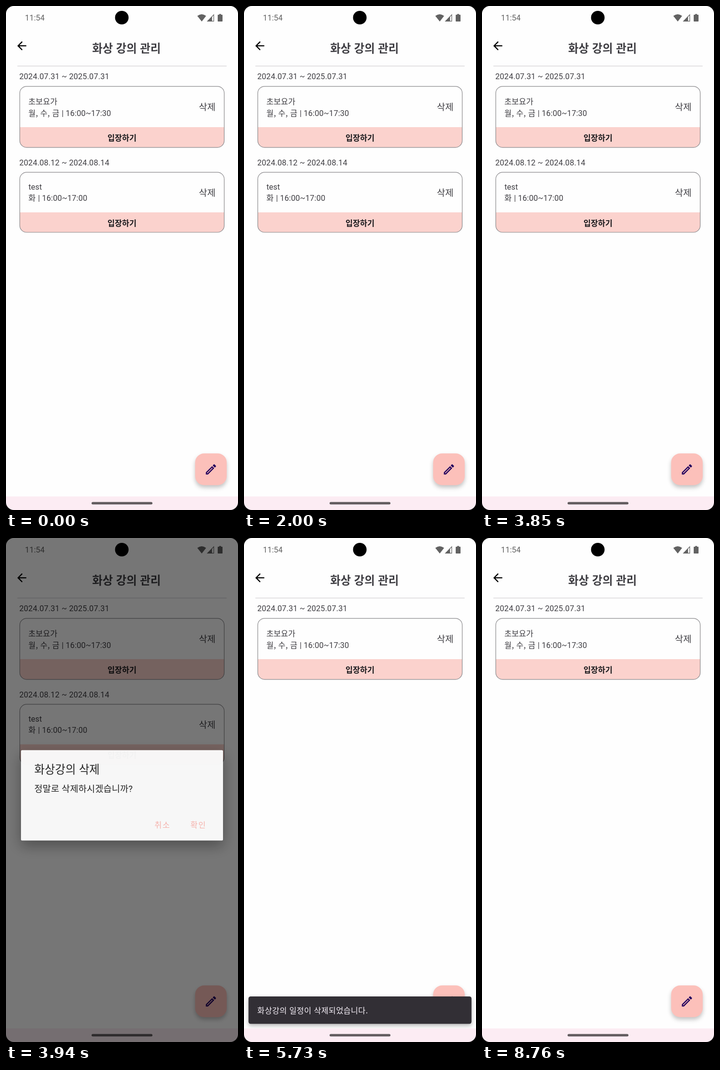
Recreate the animation shown at these times as an HTML page. Size 480x1040 px, loop 8940 ms.

```html
<!DOCTYPE html>
<html lang="ko">
<head>
<meta charset="utf-8">
<style>
  html, body { margin: 0; width: 100%; height: 100%; overflow: hidden; background: #000; }
  svg { display: block; width: 480px; height: 1040px; }
  text { font-family: Roboto, "Noto Sans CJK KR", "Noto Sans CJK", sans-serif; font-size: 16.33px; fill: #3f3e43; white-space: pre; }
  .kr { font-family: "Noto Sans CJK KR", "Noto Sans CJK", sans-serif; }
  .num { letter-spacing: .13px; }
  .big { font-size: 18.67px; }
  .title { font-size: 23.33px; }
  .bold { font-weight: 700; }
  .mid { text-anchor: middle; }
  .enter { fill: #1b1a1d; }
  .action { fill: #fbb5af; font-weight: 500; letter-spacing: 1.4px; }
  .frame { fill: none; stroke: #8c8b8e; stroke-width: 1.2; }
  .fab { filter: drop-shadow(0 5px 4px rgba(0,0,0,.23)); }
  .sheet { filter: drop-shadow(0 11px 14px rgba(0,0,0,.34)); }
  .bar { filter: drop-shadow(0 4px 4px rgba(0,0,0,.28)); }
</style>
</head>
<body>
<svg viewBox="0 0 480 1040" lang="ko">
  <defs>
    <clipPath id="listClip"><rect y="124" width="480" height="888"/></clipPath>
    <clipPath id="cardA"><rect x="28.5" y="165.8" width="423" height="126" rx="14"/></clipPath>
    <clipPath id="cardB"><rect x="28.5" y="343.2" width="423" height="123.8" rx="14"/></clipPath>
    <g id="system">
      <text x="39.3" y="30" style="fill:inherit">11:54</text>
      <path d="M395.8 20.6Q405 13.4 414 20.6L405 32Z"/>
      <path d="M416 32L426.3 21.3V32Z"/>
      <path d="M416.9 31.4L429.8 18V31.4Z" fill="none" stroke-width="1.2"/>
      <path d="M441 16.5h4v1.6h2.2q.8 0 .8.8v12.2q0 .9-.8.9h-8.4q-.8 0-.8-.9V18.900q0-.8.8-.8H441Z"/>
      <rect x="177" y="1023.400" width="126" height="5" rx="2.5"/>
    </g>
  </defs>

  <rect width="480" height="1040" fill="#fefefe"/>
  <path d="M20 11H7.83l5.59-5.59L12 4l-8 8 8 8 1.41-1.41L7.83 13H20v-2z" transform="translate(18.7 68.2) scale(1.167)"/>
  <text class="title bold mid kr" x="249.2" y="95.5">화상 강의 관리</text>

  <g clip-path="url(#listClip)">
    <g id="list">
      <g>
        <text class="num" x="27.500" y="151">2024.07.31 ~ 2025.07.31</text>
        <rect x="28" y="250" width="424" height="43" fill="#fbd2cd" clip-path="url(#cardA)"/>
        <rect class="frame" x="28.5" y="165.8" width="423" height="126" rx="14"/>
        <text class="kr" x="46.300" y="202.500">초보요가</text>
        <text class="num" x="46.300" y="226.800"><tspan class="kr">월, 수, 금 </tspan>| 16:00~17:30</text>
        <text class="big mid kr" x="416.200" y="215.300">삭제</text>
        <text class="bold mid kr enter" x="240" y="278.200">입장하기</text>
      </g>
      <g id="second">
        <text class="num" x="27.500" y="328.600">2024.08.12 ~ 2024.08.14</text>
        <rect x="28" y="425.800" width="424" height="42" fill="#fbd2cd" clip-path="url(#cardB)"/>
        <rect class="frame" x="28.5" y="343.2" width="423" height="123.8" rx="14"/>
        <text x="46.500" y="378.600">test</text>
        <text class="num" x="46.300" y="402.200"><tspan class="kr">화 </tspan>| 16:00~17:00</text>
        <text class="big mid kr" x="416.200" y="391.800">삭제</text>
        <text class="bold mid kr enter" x="240" y="453.600">입장하기</text>
      </g>
    </g>
  </g>
  <path d="M23.5 123.900H456.500" stroke="#d3d2d5" stroke-width="1.3"/>

  <rect class="fab" x="391.300" y="923.300" width="65.400" height="65.400" rx="18.700" fill="#fcc0ba"/>
  <path d="M14.06 9.02l.92.92L5.92 19H5v-.92l9.06-9.06M17.66 3c-.25 0-.51.1-.7.29l-1.83 1.83 3.75 3.75 1.83-1.83c.39-.39.39-1.02 0-1.41l-2.34-2.34c-.2-.2-.45-.29-.71-.29zm-3.6 3.19L3 17.25V21h3.75L17.81 9.94l-3.75-3.75z" fill="#21005d" transform="translate(410 942.200) scale(1.167)"/>

  <g id="snack">
    <rect class="bar" x="9.300" y="946" width="461.400" height="56.500" rx="4.500" fill="#322f35"/>
    <text class="kr" x="27.600" y="981" style="fill:#f5eff7;letter-spacing:.29px">화상강의 일정이 삭제되었습니다.</text>
  </g>
  <rect y="1012" width="480" height="28" fill="#fcecf3"/>

  <rect id="scrim" width="480" height="1040"/>
  <g id="dialog">
    <rect class="sheet" x="31" y="433" width="418" height="186.500" rx="2.500" fill="#fdfdfd"/>
    <text class="title kr" x="58.500" y="481" style="fill:#222;font-weight:500">화상강의 삭제</text>
    <text class="big" x="58.500" y="519.300" style="fill:#222;letter-spacing:.12px">정말로 삭제하시겠습니까?</text>
    <text class="action kr" x="307.300" y="593.200">취소</text>
    <text class="action kr" x="381.500" y="593.200">확인</text>
  </g>

  <use id="darkIcons" href="#system" fill="#000" stroke="#000" stroke-width="0"/>
  <use id="lightIcons" href="#system" fill="#fff" stroke="#fff" stroke-width="0"/>
  <circle cx="239.600" cy="24" r="14"/>
  <path fill-rule="evenodd" d="M0 0H480V1040H0ZM16 0A16 16 0 0 0 0 16V1024A16 16 0 0 0 16 1040H464A16 16 0 0 0 480 1024V16A16 16 0 0 0 464 0Z"/>
</svg>
<script>
  const LOOP = 8940;
  const PULL = 1150, OPEN = 3870, CLOSE = 4890, REMOVE = 5280, SNACK = 5300, SNACK_OUT = 8230;
  const $ = id => document.getElementById(id);
  const [list, second, snack, scrim, dialog, darkIcons, lightIcons] =
    ['list', 'second', 'snack', 'scrim', 'dialog', 'darkIcons', 'lightIcons'].map($);

  const ramp = (t, start, dur) => Math.min(1, Math.max(0, (t - start) / dur));
  const easeOut = (u, power) => 1 - Math.pow(1 - u, power);
  const smooth = u => u * u * (3 - 2 * u);

  function fade(el, alpha) {
    el.setAttribute('opacity', alpha.toFixed(4));
    el.setAttribute('visibility', alpha > 0 ? 'visible' : 'hidden');
  }

  function draw(t) {
    // overscroll: the list shifts up and stretches slightly
    const pull = easeOut(ramp(t, PULL, 300), 2) * (1 - smooth(ramp(t, 1530, 300)));
    list.setAttribute('transform', `translate(0 ${-16.4 * pull}) scale(1 ${1 + .0095 * pull})`);
    second.setAttribute('visibility', t < REMOVE ? 'visible' : 'hidden');

    const rise = 18 * (1 - easeOut(ramp(t, OPEN, 300), 5));
    dialog.setAttribute('transform', `translate(0 ${rise})`);
    fade(dialog, easeOut(ramp(t, OPEN, 110), 3) * (1 - ramp(t, CLOSE, 120) ** 3));
    fade(scrim, .6 * ramp(t, OPEN, 80) * (1 - ramp(t, CLOSE, 143)));

    const light = ramp(t, 3960, 120) * (1 - ramp(t, 5040, 120));
    fade(darkIcons, .61 * (1 - light));
    fade(lightIcons, light);

    const grow = .8 + .2 * easeOut(ramp(t, SNACK, 150), 2);
    snack.setAttribute('transform', `translate(240 974.3) scale(${grow}) translate(-240 -974.3)`);
    fade(snack, ramp(t, SNACK, 150) * (1 - ramp(t, SNACK_OUT, 75)));
  }

  const begin = performance.now();
  function tick() {
    draw((performance.now() - begin) % LOOP);
    requestAnimationFrame(tick);
  }
  draw(0);
  requestAnimationFrame(tick);
</script>
</body>
</html>
```
